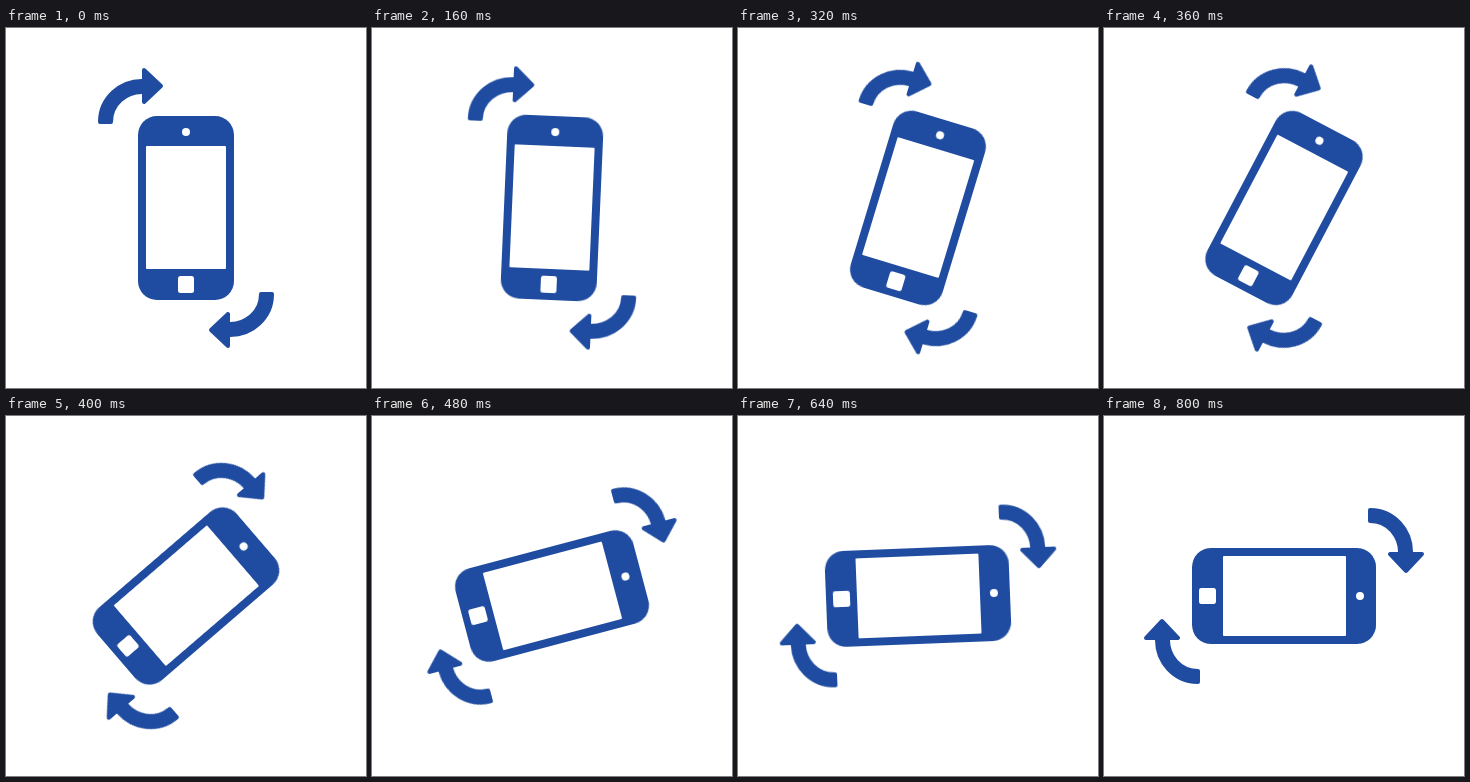
Recreate the animation shown at these times as an HTML page without scripts. Size 360x360 px, loop 4 s.

```html
<!DOCTYPE html>
<html lang="en">
<head>
<meta charset="utf-8">
<title>Rotate your phone</title>
<style>
  html, body {
    margin: 0;
    width: 100%;
    height: 100%;
    overflow: hidden;
    background: #fff;
  }
  svg { display: block; width: 100%; height: 100%; }
  .turn {
    fill: #1f4ca0;
    transform-origin: 180px 180px;
    animation: turn 4s infinite;
  }
  .arrow {
    stroke: #1f4ca0;
    stroke-width: 4;
    stroke-linejoin: round;
  }
  .hole { fill: #fff; }
  @keyframes turn {
    0% { transform: rotate(0deg); animation-timing-function: cubic-bezier(.81, 0, .17, 1); }
    20%, 100% { transform: rotate(90deg); }
  }
</style>
</head>
<body>
<svg viewBox="0 0 360 360">
  <defs>
    <path id="arrow" class="arrow" d="M94 94A42 41 0 0 1 138 53V42L155 58 138 74V64A31 30 0 0 0 105 94Z"/>
  </defs>
  <g class="turn">
    <rect x="132" y="88" width="96" height="184" rx="19"/>
    <g class="hole">
      <rect x="140" y="118" width="80" height="123" rx="1"/>
      <circle cx="180" cy="104" r="4"/>
      <rect x="172" y="248" width="16" height="17" rx="2.5"/>
    </g>
    <use href="#arrow"/>
    <use href="#arrow" transform="rotate(180 180 180)"/>
  </g>
</svg>
</body>
</html>
```
